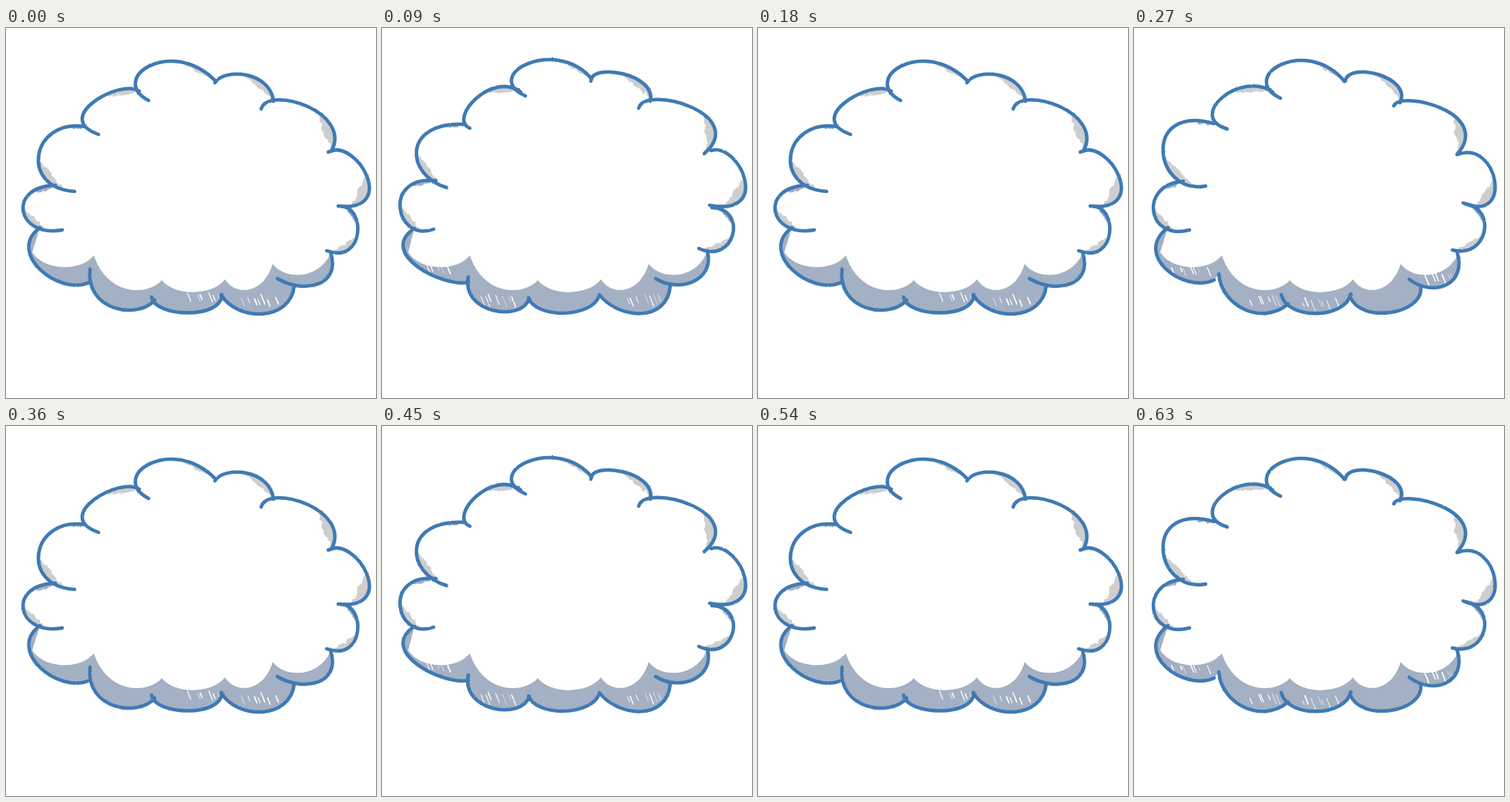
These frames come from a looping animation (480 by 480 pixels, 720 ms). An HTML page:

```html
<!DOCTYPE html>
<html lang="en">
<head>
<meta charset="utf-8">
<title>Cloud</title>
<style>
  html, body { margin: 0; width: 100%; height: 100%; overflow: hidden; background: #fff; }
  svg { display: block; width: 100%; height: 100%; }
  .pose { opacity: 0; }
  .line { fill: none; stroke: #3f7ab4; stroke-width: 4.5; stroke-linecap: round; }
  .blue { fill: #a4b0c3; }
  .gray { fill: #cecece; }
  .gap { fill: none; stroke: #fff; stroke-linecap: round; }
</style>
</head>
<body>
<svg id="stage" viewBox="0 0 480 480">
  <defs>
    <filter id="pen" filterUnits="userSpaceOnUse" x="0" y="0" width="480" height="480" color-interpolation-filters="sRGB">
      <feTurbulence type="fractalNoise" baseFrequency=".4" seed="4"/>
      <feDisplacementMap in="SourceGraphic" scale="2" xChannelSelector="R" yChannelSelector="G"/>
    </filter>
    <filter id="chalk" filterUnits="userSpaceOnUse" x="0" y="0" width="480" height="480" color-interpolation-filters="sRGB">
      <feTurbulence type="fractalNoise" baseFrequency=".16" numOctaves="2" seed="9"/>
      <feDisplacementMap in="SourceGraphic" scale="6" xChannelSelector="R" yChannelSelector="G"/>
    </filter>
  </defs>
</svg>
<script>
const NS = 'http://www.w3.org/2000/svg';
const stage = document.getElementById('stage');
const STEP = 90;
const BEATS = 4;

// Lobes run clockwise from the top; each passes through four points at equal
// steps of t. Hatch gives the centres of the pale streaks.
const poses = [
  {
    beats: [0, 2],
    hatch: '262,350 328,354',
    lobes: [
      '185,94 171,62 212,43 272,69',
      '271,71 295,60 328,67 347,95',
      '331,105 365,94 413,116 422,160',
      '418,161 455,172 471,212 431,231',
      '433,231 455,250 450,282 416,289',
      '421,291 417,324 388,335 352,325',
      '374,334 352,366 312,369 279,346',
      '280,346 257,367 214,367 189,349',
      '193,353 160,366 123,353 109,313',
      '108,330 64,327 32,296 44,259',
      '73,262 30,252 25,222 64,204',
      '89,212 45,186 52,144 103,128',
      '120,138 101,110 135,84 173,82'
    ]
  },
  {
    beats: [1],
    hatch: '66,313 150,353 340,353',
    lobes: [
      '186,88 172,58 216,41 272,66',
      '271,69 293,57 332,67 348,95',
      '333,104 372,94 424,118 418,163',
      '427,159 461,176 470,216 425,230',
      '428,233 455,252 447,282 411,286',
      '422,289 416,320 388,333 355,325',
      '374,334 354,366 316,368 282,346',
      '282,347 256,367 216,368 190,350',
      '191,351 164,368 126,358 112,323',
      '112,330 68,322 31,294 42,260',
      '67,261 30,251 27,215 70,198',
      '84,207 48,178 53,141 108,125',
      '114,130 110,106 140,80 180,83'
    ]
  },
  {
    beats: [3],
    hatch: '74,314 176,354 240,358 402,324',
    lobes: [
      '190,91 175,60 216,42 273,69',
      '274,69 298,57 335,69 345,97',
      '337,101 373,96 421,119 419,164',
      '420,164 460,178 466,219 427,227',
      '430,228 454,249 447,279 413,288',
      '419,290 416,324 390,337 357,326',
      '372,336 353,363 311,369 280,348',
      '281,345 257,367 217,368 191,346',
      '200,358 162,370 127,354 110,319',
      '104,327 60,325 30,296 44,259',
      '72,262 32,253 28,220 64,199',
      '93,205 45,184 44,136 104,124',
      '121,131 103,105 134,79 180,83'
    ]
  }
];

// Crescents inside the lobes: lobe, range of t, depth, colour.
const shades = [
  [0, 0.75, 1, 5, 'gray'],
  [1, 0.45, 1, 9, 'gray'],
  [2, 0.6, 1, 14, 'gray'],
  [3, 0.48, 0.95, 15, 'gray'],
  [4, 0.5, 1, 9, 'gray'],
  [10, 0.1, 0.55, 9, 'gray'],
  [11, 0.05, 0.48, 10, 'gray'],
  [12, 0.6, 1, 8, 'gray'],
  [4, 0.03, 0.4, 5, 'blue'],
  [9, 0.65, 1, 6, 'blue'],
  [10, 0.78, 1, 6, 'blue'],
  [11, 0.88, 1, 4, 'blue']
];

const cusps = '34,291 114,295 202,327 284,326 346,306 421,292';

const points = text => text.split(' ').map(s => s.split(',').map(Number));

function add(parent, tag, attrs) {
  const el = document.createElementNS(NS, tag);
  for (const k in attrs) el.setAttribute(k, attrs[k]);
  return parent.appendChild(el);
}

// Bezier controls of the cubic through four evenly timed points.
function bezier(text) {
  const [a, p, q, b] = points(text);
  const control = (e, m, n, f) => e.map((v, k) => (-5 * v + 18 * m[k] - 9 * n[k] + 2 * f[k]) / 6);
  return [a, control(a, p, q, b), control(b, q, p, a), b];
}

const path = ([a, c, d, b], start = 'M') => `${start}${a}C${c} ${d} ${b}`;

// Place and inward unit normal on a clockwise curve.
function along([a, c, d, b], t) {
  const u = 1 - t;
  const at = k => u * u * u * a[k] + 3 * u * u * t * c[k] + 3 * u * t * t * d[k] + t * t * t * b[k];
  const slope = k => u * u * (c[k] - a[k]) + 2 * u * t * (d[k] - c[k]) + t * t * (b[k] - d[k]);
  const size = Math.hypot(slope(0), slope(1));
  return { x: at(0), y: at(1), nx: -slope(1) / size, ny: slope(0) / size };
}

function crescent(lobe, from, to, depth) {
  const outer = [], inner = [];
  for (let i = 0; i <= 12; i++) {
    const p = along(lobe, from + (to - from) * i / 12);
    const h = depth * Math.sin(Math.PI * i / 12);
    outer.push([p.x, p.y]);
    inner.unshift([p.x + p.nx * h, p.y + p.ny * h]);
  }
  return 'M' + outer.concat(inner).join('L') + 'Z';
}

// Scalloped upper edge of the bottom shade.
function rim() {
  const p = points(cusps);
  return p.slice(1).map((b, i) => {
    const a = p[i], low = Math.max(a[1], b[1]) + 21, in_ = (b[0] - a[0]) * 0.2;
    return path([a, [a[0] + in_, low], [b[0] - in_, low], b], i ? 'L' : 'M');
  }).join('');
}

function random(seed) {
  return () => (seed = seed * 16807 % 2147483647) / 2147483647;
}

function streaks(parent, text, rnd) {
  for (const [cx, cy] of points(text)) {
    for (let i = -3; i <= 3; i++) {
      const x = cx + 7 * (i + rnd() - 0.5), y = cy + 6 * (rnd() - 0.5);
      const len = 4 + 10 * rnd();
      add(parent, 'path', {
        class: 'gap',
        d: `M${x - len / 5},${y - len / 2}l${len * 0.4},${len}`,
        'stroke-width': 0.5 + 1.2 * rnd()
      });
    }
  }
}

function draw(pose, index) {
  const g = add(stage, 'g', { class: 'pose' });
  const chalk = add(g, 'g', { filter: 'url(#chalk)' });
  const pen = add(g, 'g', { filter: 'url(#pen)' });
  const lobes = pose.lobes.map(bezier);

  for (const [i, from, to, depth, tone] of shades) {
    add(chalk, 'path', { class: tone, d: crescent(lobes[i], from, to, depth) });
  }
  const floor = lobes.slice(5, 10).map(l => path(l, 'L')).join('');
  add(pen, 'path', { class: 'blue', d: rim() + floor + 'Z' });
  streaks(pen, pose.hatch, random(71 + index * 5003));
  lobes.forEach(l => add(pen, 'path', { class: 'line', d: path(l) }));
  return g;
}

poses.forEach((pose, i) => {
  const frames = Array.from({ length: BEATS + 1 }, (_, k) => ({
    opacity: pose.beats.includes(k % BEATS) ? 1 : 0,
    offset: k / BEATS,
    easing: 'steps(1, end)'
  }));
  const anim = draw(pose, i).animate(frames, { duration: BEATS * STEP, iterations: Infinity });
  anim.startTime = 0;
});
</script>
</body>
</html>
```
